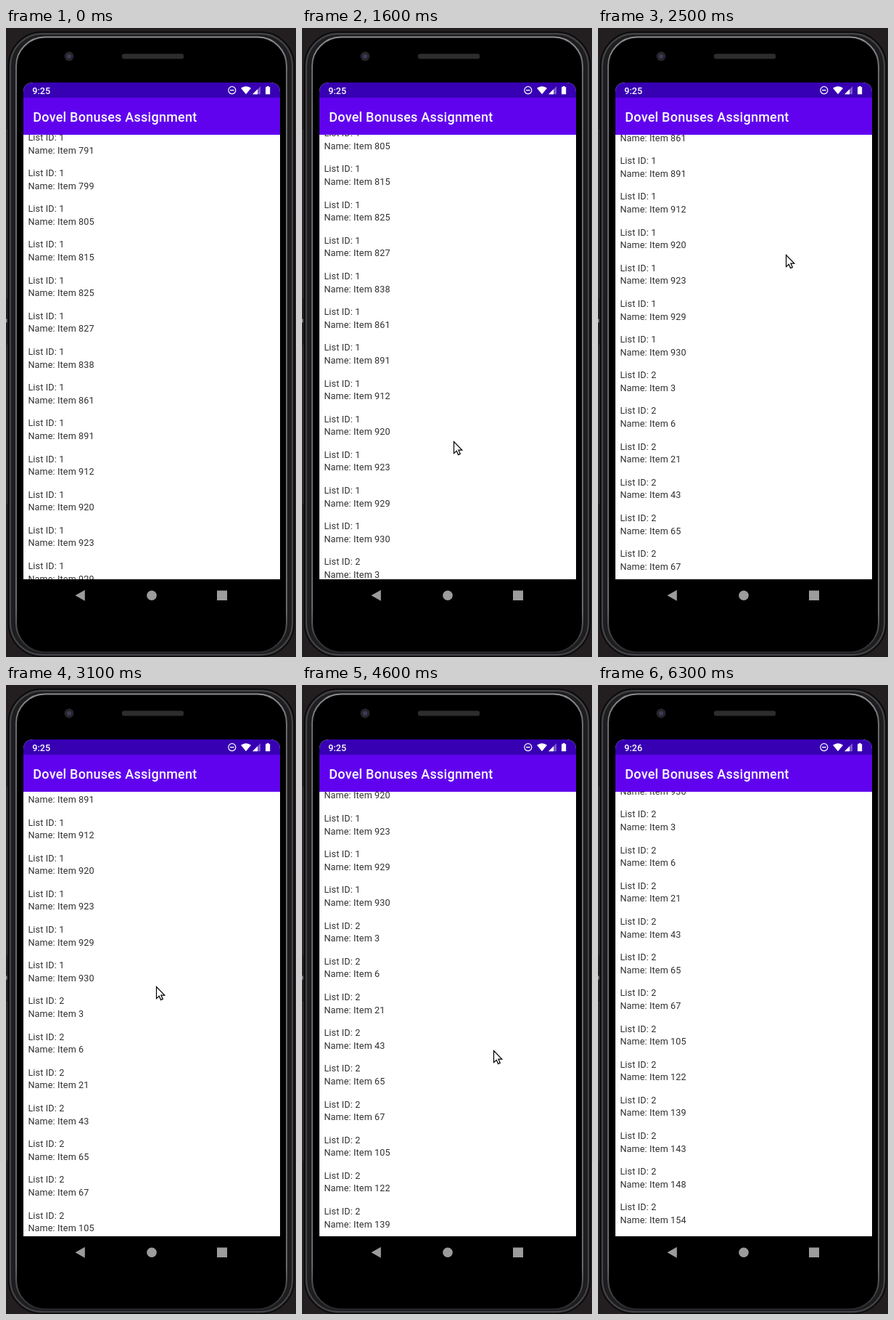
Write an HTML page that moves like this. It is 400x866 px and loops after 6800 ms.

```html
<!DOCTYPE html>
<html lang="en">
<head>
<meta charset="utf-8">
<title>Scrolling list</title>
<style>
  html, body { margin: 0; width: 100%; height: 100%; overflow: hidden; background: #231f20; }
  svg { display: block; width: 400px; height: 866px; font-family: Roboto, sans-serif; }
  .row { font-size: 12.62px; letter-spacing: .011em; fill: #303030; }
  .title { font-size: 18.03px; font-weight: 500; letter-spacing: .0125em; fill: #fff; }
  .clock { font-size: 12.6px; font-weight: 500; fill: #fff; }
</style>
</head>
<body>
<svg viewBox="0 0 400 866">
  <defs>
    <clipPath id="screen"><path d="M24 759V89q0-14 14-14H364q14 0 14 14V759Z"/></clipPath>
    <linearGradient id="rim" x2="0" y2="1">
      <stop offset="0" stop-color="#8d8c91"/>
      <stop offset=".06" stop-color="#69686d"/>
      <stop offset=".93" stop-color="#69686d"/>
      <stop offset="1" stop-color="#2a292b"/>
    </linearGradient>
  </defs>

  <rect width="400" height="866" fill="#231f20"/>
  <path d="M1.5 140V372M1.5 436V655" stroke="#39373a"/>
  <rect y="400.5" width="1.5" height="5" fill="#8b8a8d"/>
  <rect x="3.5" y="5.5" width="394" height="860" rx="46" fill="#1d1c1e" stroke="#0a090a" stroke-width="1.5"/>
  <rect x="6" y="8" width="389" height="855" rx="44" fill="none" stroke="#454448" stroke-width="2"/>
  <rect x="14" y="12.5" width="373" height="847" rx="40" fill="#000" stroke="url(#rim)" stroke-width="2"/>
  <circle cx="87" cy="39" r="6.5" fill="#25252a"/>
  <circle cx="87" cy="39" r="3" fill="#3b3c58"/>
  <rect x="160" y="35.5" width="85" height="7" rx="2.5" fill="#2d2c2e"/>

  <g clip-path="url(#screen)">
    <rect x="24" y="75" width="354" height="684" fill="#fff"/>
    <g id="list" class="row"></g>
    <rect x="24" y="75" width="354" height="21.5" fill="#3700b3"/>
    <rect x="24" y="96" width="354" height="51" fill="#6002ee"/>
  </g>
  <text id="clock" class="clock" x="36.3" y="90.5">9:25</text>
  <text class="title" x="37.3" y="129">Dovel Bonuses Assignment</text>

  <g fill="#fff">
    <circle cx="311.8" cy="85.7" r="5" fill="none" stroke="#fff" stroke-width="1.2"/>
    <rect x="309" y="85" width="5.6" height="1.4"/>
    <path d="M324 82.8Q331 77.8 338 82.8L331 91.3Z"/>
    <path d="M340 91.3L351 80.3V91.3Z" opacity=".35"/>
    <path d="M340 91.3L347 84.3V91.3Z"/>
    <path d="M358 81.3h1.8v-1.2h2.6v1.2h1.8v10h-6.2Z"/>
  </g>

  <g fill="#9c9c9c">
    <path d="M95.5 781.3L108.8 773.8V788.8Z"/>
    <circle cx="201" cy="781.3" r="6.8"/>
    <rect x="291" y="774.5" width="14" height="13.5"/>
  </g>

  <path id="cursor" d="M.5.5V16.6L4.2 13.2 6.6 18.6 9.3 17.4 6.9 12.1H11.8Z" fill="#fff" stroke="#000" stroke-width="1.2"/>
</svg>
<script>
  const LOOP = 6800, STEP = 100, LAST = 6300, PITCH = 49.18;
  const $ = id => document.getElementById(id);
  const lists = [
    '791 799 805 815 825 827 838 861 891 912 920 923 929 930',
    '3 6 21 43 65 67 105 122 139 143 148 154 159'
  ];
  // Pointer stops; a drag ends at each stop marked so
  const stops = [
    { t: 600, x: 378, y: 738 },
    { t: 1100, x: 187, y: 652 },
    { t: 1236, x: 189, y: 673 },
    { t: 2650, x: 267, y: 269, drag: true },
    { t: 3100, x: 207, y: 415 },
    { t: 4018, x: 245, y: 607 },
    { t: 5459, x: 293, y: 350, drag: true },
    { t: 6000, x: 379, y: 430 }
  ];

  function addLine(text, y) {
    const el = document.createElementNS('http://www.w3.org/2000/svg', 'text');
    el.setAttribute('x', 30.4);
    el.setAttribute('y', y);
    el.textContent = text;
    $('list').append(el);
  }

  let baseline = 154.9;
  lists.forEach((items, i) => items.split(' ').forEach(item => {
    addLine(`List ID: ${i + 1}`, baseline);
    addLine(`Name: Item ${item}`, baseline + 17.6);
    baseline += PITCH;
  }));

  // Follow the pointer; the list moves with it during drags
  function pose(t) {
    let { x, y } = stops[0], scroll = 0;
    for (let i = 1; i < stops.length && t > stops[i - 1].t; i++) {
      const a = stops[i - 1], b = stops[i];
      const p = Math.min(1, (t - a.t) / (b.t - a.t));
      const e = b.drag ? p : p * (2 - p);
      x = a.x + (b.x - a.x) * e;
      y = a.y + (b.y - a.y) * e;
      if (b.drag) scroll += a.y - y;
    }
    return { x, y, scroll };
  }

  function draw(time) {
    const t = Math.min(Math.floor(time % LOOP / STEP) * STEP, LAST);
    const { x, y, scroll } = pose(t);
    const shown = t >= stops[0].t && t < stops[stops.length - 1].t;
    $('list').setAttribute('transform', `translate(0 ${-scroll})`);
    $('cursor').setAttribute('transform', `translate(${Math.round(x)} ${Math.round(y)})`);
    $('cursor').setAttribute('visibility', shown ? 'visible' : 'hidden');
    $('clock').textContent = t < 5900 ? '9:25' : '9:26';
  }

  const start = performance.now();
  function tick() {
    draw(performance.now() - start);
    requestAnimationFrame(tick);
  }
  tick();
</script>
</body>
</html>
```
